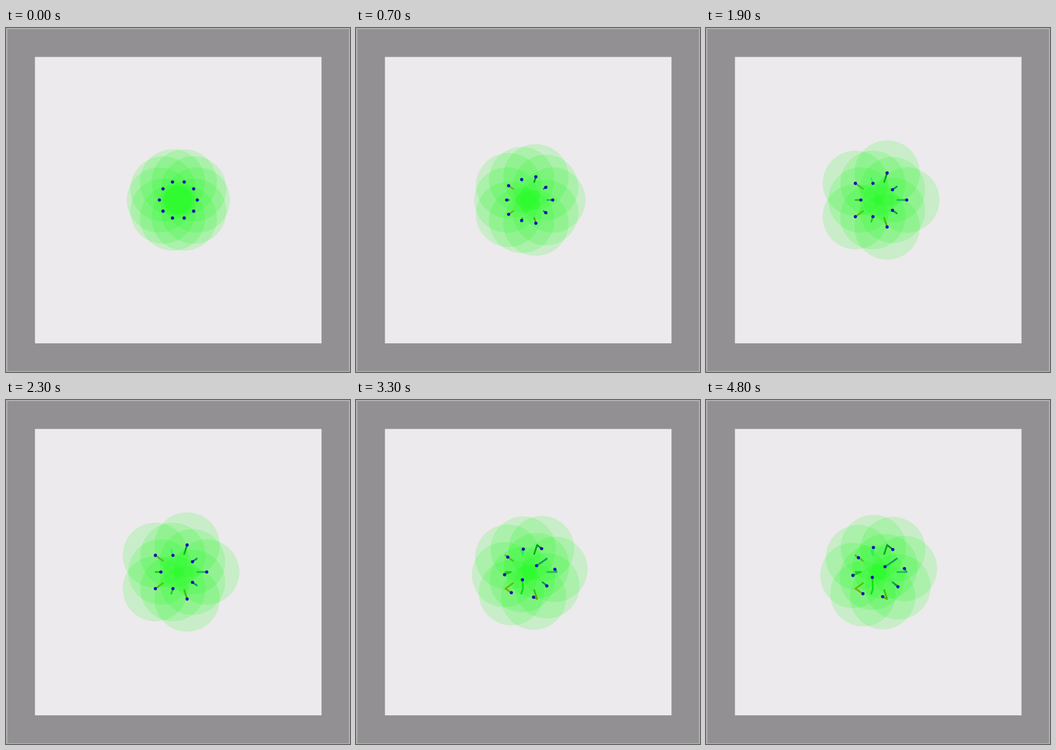
These frames come from a looping animation (600x600 px, 4900 ms). An HTML page:

```html
<!DOCTYPE html>
<html lang="en">
<head>
<meta charset="utf-8">
<title>Swarm</title>
<style>
  html, body { margin: 0; width: 100%; height: 100%; overflow: hidden; background: #929092; }
  svg { display: block; width: 100%; height: 100%; }
</style>
</head>
<body>
<svg id="stage" viewBox="0 0 600 600">
  <rect width="600" height="600" fill="#b1afb1"/>
  <rect x="2.5" y="2" width="595.5" height="596.5" fill="#929092"/>
  <rect x="50.5" y="50.5" width="499.8" height="499.5" fill="#eceaec"/>
  <g id="trails" fill="none" stroke-width="3" stroke-linecap="round" stroke-linejoin="round"></g>
  <g id="ranges" fill="#0f0" fill-opacity=".15"></g>
  <g id="bodies" fill="#120fb4"></g>
</svg>
<script>
const LOOP = 4900, STEP = 100;
const CENTER = { x: 300.6, y: 300 }, START_RADIUS = 33;
const SPEED = .0136, MAX_TRAVEL = 16.5;
const REGROUP_START = 2400, REGROUP_PACE = 600;

// Trail colour and final place of each robot, counter-clockwise from the right.
const ROBOTS = [
  { color: '#4155d9', x: 346, y: 294 },
  { color: '#2c00ff', x: 312, y: 291 },
  { color: '#171e4d', x: 326, y: 261 },
  { color: '#64dcff', x: 292, y: 257 },
  { color: '#e7507d', x: 266, y: 275 },
  { color: '#3c823c', x: 256, y: 306 },
  { color: '#ec5d14', x: 274, y: 338 },
  { color: '#24a532', x: 290, y: 309 },
  { color: '#c8461b', x: 308, y: 343 },
  { color: '#201ec8', x: 335, y: 326 }
];

// Robots leave along their spokes; every second one soon turns back.
function spread(index, time) {
  const peak = index % 2 ? 40 : 50;
  const travel = Math.min(SPEED * time, MAX_TRAVEL);
  const radius = peak - Math.abs(START_RADIUS + travel - peak);
  const angle = -index * Math.PI / 5;
  return { x: CENTER.x + radius * Math.cos(angle), y: CENTER.y + radius * Math.sin(angle) };
}

// After a rest, each robot eases to its final place.
function positionAt(index, time) {
  const from = spread(index, time), to = ROBOTS[index];
  const ease = 1 - Math.exp(-Math.max(0, time - REGROUP_START) / REGROUP_PACE);
  return { x: from.x + (to.x - from.x) * ease, y: from.y + (to.y - from.y) * ease };
}

function add(parent, tag, attributes) {
  const node = document.createElementNS('http://www.w3.org/2000/svg', tag);
  for (const name in attributes) node.setAttribute(name, attributes[name]);
  return document.getElementById(parent).appendChild(node);
}

const shapes = ROBOTS.map(({ color }) => ({
  trail: add('trails', 'polyline', { stroke: color }),
  range: add('ranges', 'circle', { r: 57 }),
  body: add('bodies', 'circle', { r: 2.8 })
}));

function draw(elapsed) {
  const steps = Math.floor((elapsed % LOOP) / STEP);
  shapes.forEach(({ trail, range, body }, index) => {
    const path = Array.from({ length: steps + 1 }, (_, i) => positionAt(index, i * STEP));
    const place = path[steps];
    trail.setAttribute('points', steps ? path.map(p => `${p.x},${p.y}`).join(' ') : '');
    for (const circle of [range, body]) {
      circle.setAttribute('cx', place.x);
      circle.setAttribute('cy', place.y);
    }
  });
}

let begin;
function tick(now) {
  begin ??= now;
  draw(now - begin);
  requestAnimationFrame(tick);
}
draw(0);
requestAnimationFrame(tick);
</script>
</body>
</html>
```
